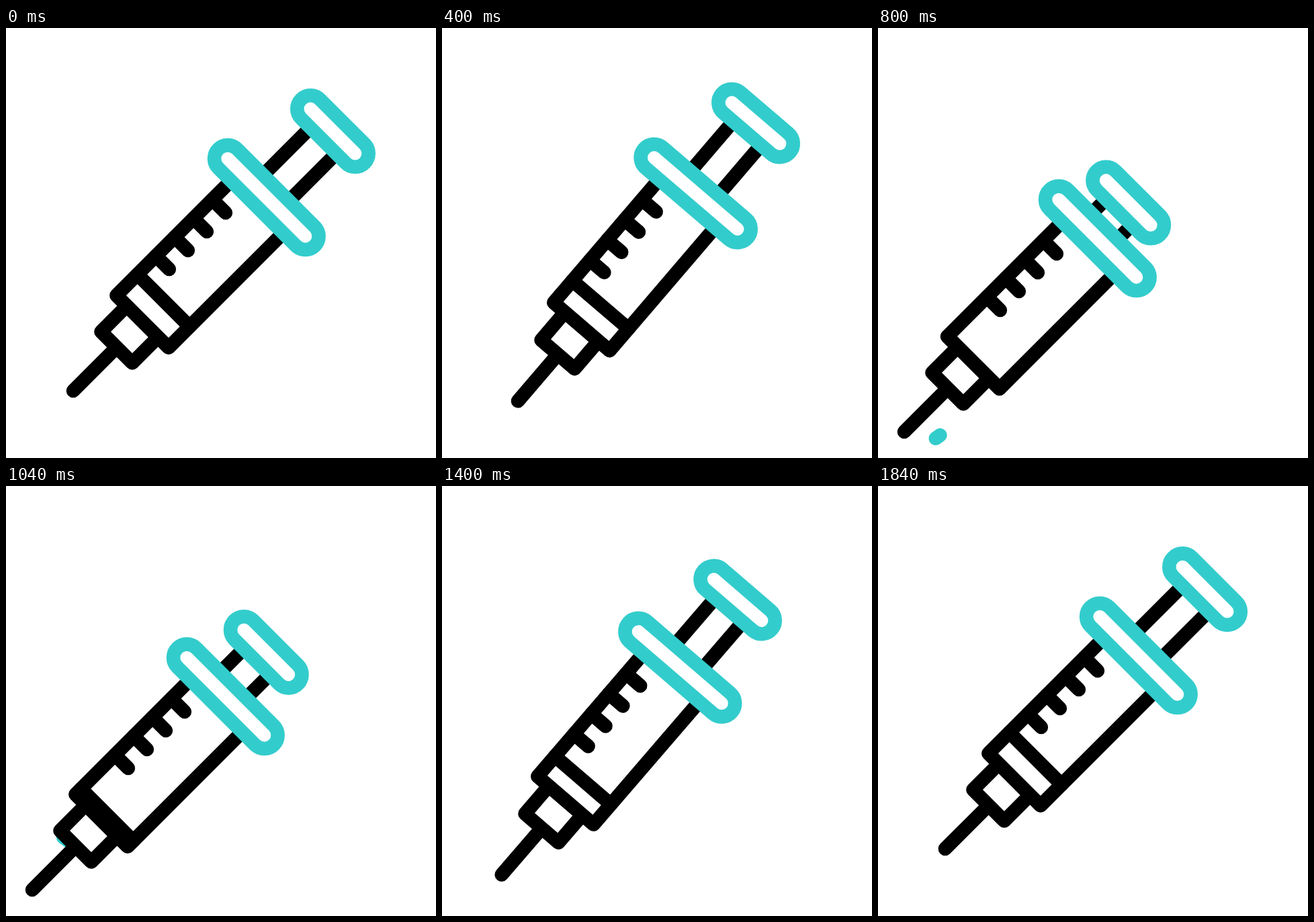
An HTML page with a canvas that plays this animation: 640 by 640 pixels, repeating every 2200 ms.

```html
<!DOCTYPE html>
<html lang="en">
<head>
<meta charset="utf-8">
<title>Syringe</title>
<style>
  html, body { margin: 0; width: 100%; height: 100%; overflow: hidden; background: #fff; }
  canvas { display: block; width: 640px; height: 640px; }
</style>
</head>
<body>
<canvas id="stage" width="640" height="640"></canvas>
<script>
const ctx = document.getElementById('stage').getContext('2d');
const LOOP = 2200, STEP = 40;
const BLACK = '#000', TEAL = '#33cccc', WHITE = '#fff';
const RAD = Math.PI / 180;

// Keys are [time, value] pairs, eased in and out between neighbours.
const TILT = [[200, 0], [360, -5], [600, 2.7], [760, 0], [1160, 0], [1360, -5], [1560, 2], [1860, 0]];
const LUNGE = [[360, 0], [760, 61], [1200, 61], [1560, 0]];
const PRESS = [[360, 0], [760, 1], [1560, 0]];
const DROP_HEAD = [[728, 0], [1295, 1]];
const DROP_TAIL = [[800, 0], [1305, 1]];

const PIVOT = 52.3;
const WALL = 54.9, BARREL_END = 165.2, FLANGE = -95.9;

function ease(x) {
  return x * x * (3 - 2 * x);
}

function track(keys, t) {
  if (t <= keys[0][0]) return keys[0][1];
  for (let i = 1; i < keys.length; i++) {
    const [t0, a] = keys[i - 1], [t1, b] = keys[i];
    if (t < t1) return a + (b - a) * ease((t - t0) / (t1 - t0));
  }
  return keys[keys.length - 1][1];
}

function line(...points) {
  ctx.beginPath();
  points.forEach(([x, y]) => ctx.lineTo(x, y));
  ctx.stroke();
}

function box(half, top, bottom) {
  ctx.beginPath();
  ctx.rect(-half, top, half * 2, bottom - top);
  ctx.fill();
  ctx.stroke();
}

function capsule(x, y, half) {
  const r = 20;
  ctx.beginPath();
  ctx.arc(x - half, y, r, Math.PI / 2, Math.PI * 1.5);
  ctx.arc(x + half, y, r, -Math.PI / 2, Math.PI / 2);
  ctx.closePath();
  ctx.fill();
  ctx.stroke();
}

function drawDrop(t) {
  const head = track(DROP_HEAD, t), tail = track(DROP_TAIL, t);
  if (head - tail < 1e-4) return;
  const angle = k => (60 - 210 * k) * RAD;
  ctx.strokeStyle = TEAL;
  ctx.beginPath();
  ctx.arc(60.5, 567, 50.5, angle(tail), angle(head), true);
  ctx.stroke();
}

function drawSyringe(t) {
  const lunge = track(LUNGE, t), press = track(PRESS, t);
  const cap = -235.4 + 70 * press;
  const drift = -5.2 * press; // the plunger slides slightly off the axis
  const seal = 121 + 45 * press;

  ctx.save();
  ctx.translate(320 - lunge, 320 + lunge);
  ctx.rotate(45 * RAD);
  ctx.translate(0, PIVOT);
  ctx.rotate(track(TILT, t) * RAD);
  ctx.translate(0, -PIVOT);

  ctx.strokeStyle = BLACK;
  line([0, 219.6], [0, 311.1]);
  box(32.9, BARREL_END, 219.6);
  box(WALL, FLANGE, BARREL_END);
  for (let i = 0; i < 4; i++) {
    const y = -36.7 + i * 39.6;
    line([-WALL, y], [-27, y]);
  }
  line([-WALL, seal], [WALL, seal]);
  for (const x of [drift - 27.2, drift + 27.2]) line([x, cap], [x, FLANGE]);

  ctx.strokeStyle = TEAL;
  capsule(drift, cap, 47);
  capsule(0, FLANGE, 81.7);
  ctx.restore();
}

function render(now) {
  const t = Math.floor((now % LOOP) / STEP) * STEP;
  ctx.fillStyle = WHITE;
  ctx.fillRect(0, 0, 640, 640);
  ctx.lineWidth = 20.6;
  ctx.lineCap = ctx.lineJoin = 'round';
  drawDrop(t);
  drawSyringe(t);
}

const start = performance.now();
function loop() {
  render(performance.now() - start);
  requestAnimationFrame(loop);
}
loop();
</script>
</body>
</html>
```
